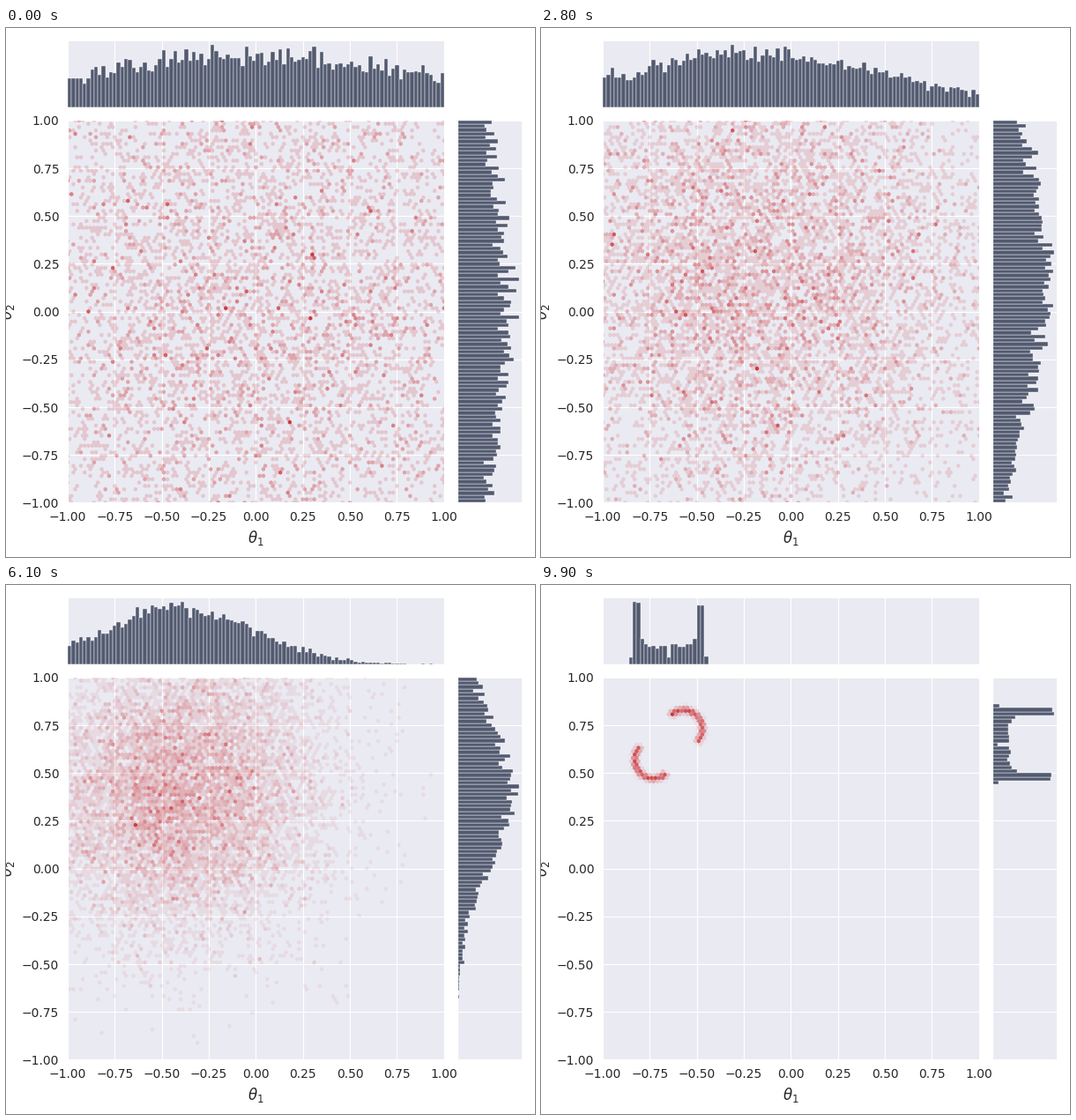
Animation of 600x600 px, one loop 10 s. Source, as a matplotlib script:

```python
import numpy as np
import matplotlib.pyplot as plt
from matplotlib.animation import FuncAnimation
from matplotlib.colors import LinearSegmentedColormap

SIZE, FRAMES, STEP = 600, 100, 100
N, BINS, GRID = 10000, 100, 100
FACE, INK, SLATE = "#eaeaf2", "#262626", "#525a70"
RED = (0.808, 0.227, 0.243)
LIM = (-1, 1)
TICKS = np.linspace(-1, 1, 9)

plt.rcParams.update({
    "font.family": "DejaVu Sans",
    "font.size": 10,
    "mathtext.fontset": "dejavusans",
    "text.color": INK,
    "axes.labelcolor": INK,
    "axes.facecolor": FACE,
    "axes.edgecolor": "white",
    "axes.axisbelow": True,
    "axes.linewidth": 0.8,
    "grid.color": "white",
    "grid.linewidth": 0.8,
})

# Gaussian noise flows in straight lines onto two facing crescents.
rng = np.random.default_rng(7)
noise = rng.standard_normal((N, 2))
side = rng.choice([-1, 1], N)
angle = rng.uniform(-np.pi / 4, 3 * np.pi / 4, N)
radius = rng.normal(0.1, 0.01, N)
moons = np.column_stack([
    -0.65 + side * (0.08 + radius * np.cos(angle)),
    0.65 + side * (0.08 + radius * np.sin(angle)),
])

fig = plt.figure(figsize=(SIZE / 100, SIZE / 100), dpi=100, facecolor="white")


def add_axes(left, top, right, bottom, spines):
    ax = fig.add_axes([left / SIZE, 1 - bottom / SIZE,
                       (right - left) / SIZE, (bottom - top) / SIZE])
    for name, spine in ax.spines.items():
        spine.set_visible(name in spines)
    ax.tick_params(length=0, pad=7, labelcolor=INK)
    return ax


joint = add_axes(70, 104.8, 496.8, 538.4, ("left", "bottom"))
top = add_axes(70, 15, 496.8, 89.8, ("bottom",))
right = add_axes(511.5, 104.8, 585, 538.4, ("left",))

joint.set(xlim=LIM, ylim=LIM, xticks=TICKS, yticks=TICKS)
joint.set_xlabel(r"$\theta_1$", fontsize=12)
joint.set_ylabel(r"$\theta_2$", fontsize=12)
joint.grid(True)

top.set(xlim=LIM, xticks=TICKS, yticks=[])
top.tick_params(labelbottom=False)
top.grid(True, axis="x")

right.set(ylim=LIM, yticks=TICKS, xticks=[])
right.tick_params(labelleft=False)
right.grid(True, axis="y")

edges = np.linspace(*LIM, BINS + 1)
width = edges[1] - edges[0]
style = dict(align="edge", color=SLATE, edgecolor="white", linewidth=0.31)
cols = top.bar(edges[:-1], np.zeros(BINS), width, **style)
rows = right.barh(edges[:-1], np.zeros(BINS), width, **style)

cmap = LinearSegmentedColormap.from_list("fade", [(*RED, 0), (*RED, 1)])
hexes = None


def update(i):
    global hexes
    t = i / (FRAMES - 1)
    x, y = ((1 - t) * noise + t * moons).T

    if hexes is not None:
        hexes.remove()
    hexes = joint.hexbin(x, y, gridsize=GRID, extent=(*LIM, *LIM), mincnt=1,
                         vmin=0, cmap=cmap, linewidths=0)
    joint.set(xlim=LIM, ylim=LIM)

    nx = np.histogram(x, edges)[0]
    ny = np.histogram(y, edges)[0]
    for col, row, cx, cy in zip(cols, rows, nx, ny):
        col.set_height(cx)
        row.set_width(cy)
    top.set_ylim(0, 1.05 * nx.max())
    right.set_xlim(0, 1.05 * ny.max())
    return [hexes, *cols, *rows]


anim = FuncAnimation(fig, update, frames=FRAMES, interval=STEP,
                     init_func=lambda: update(0), repeat=True, repeat_delay=0)
plt.show()
```
